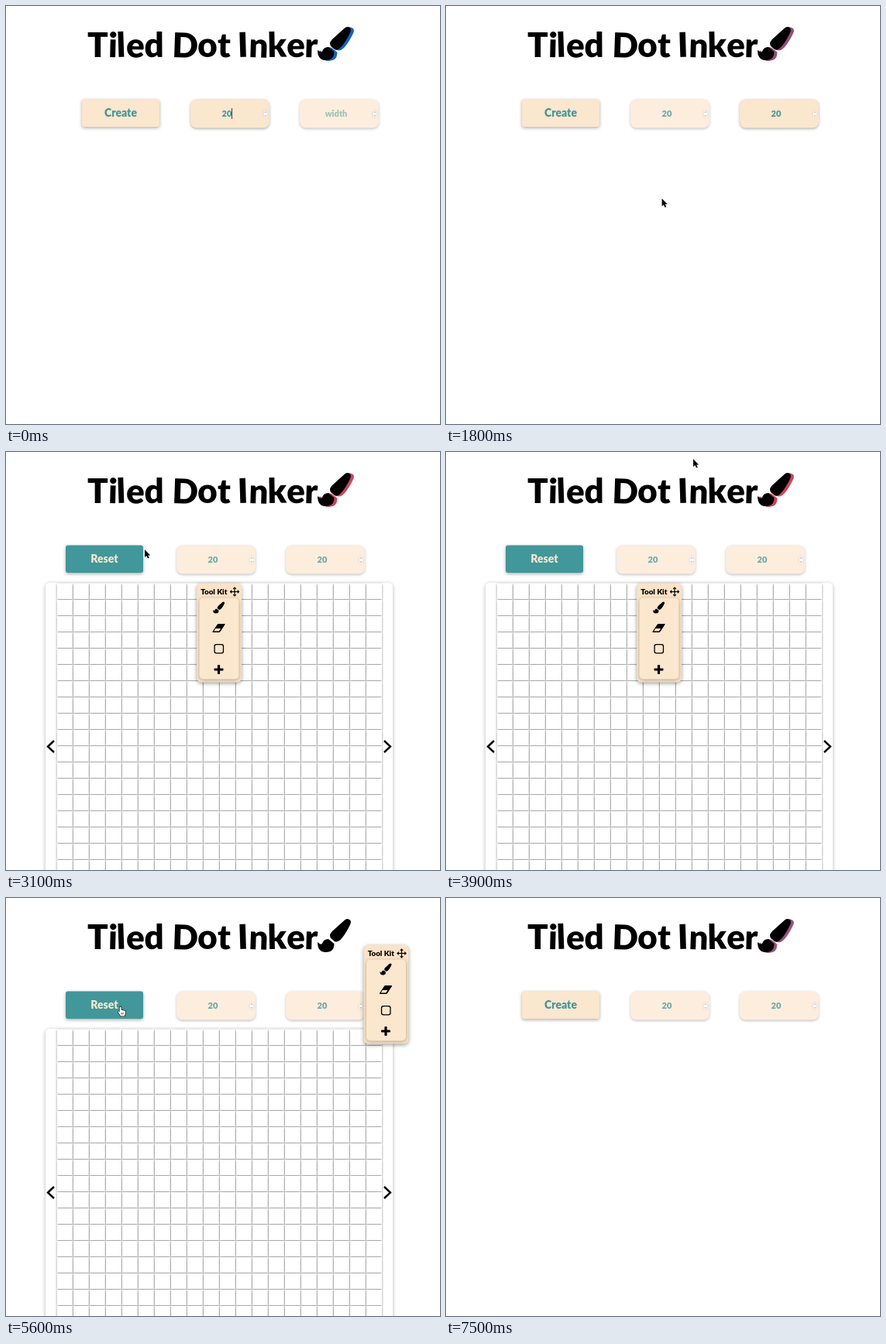
Animation, 560 px wide and 540 px high, one loop 7.6 s. Source, as an HTML page with a canvas:

```html
<!DOCTYPE html>
<html lang="en">
<head>
<meta charset="utf-8">
<title>Tiled Dot Inker</title>
<style>
html, body { margin: 0; width: 100%; height: 100%; overflow: hidden; background: #fff; }
canvas { display: block; }
</style>
</head>
<body>
<canvas id="stage" width="560" height="540"></canvas>
<script>
const W = 560, H = 540, LOOP = 7600;
const CREATE_AT = 2900, RESET_AT = 5900;
const DRAG_FROM = 4450, DRAG_TO = 4850;
const CREAM = '#fbe6ce', PALE = '#fdeddd', TEAL = '#41979a', INK = '#000';
const BLUE = [20, 98, 196], RED = [205, 68, 88];
const FACE = 'Lato, "Open Sans", sans-serif';
const ctx = document.getElementById('stage').getContext('2d');

const brush = new Path2D(
  'M14 26Q7.5 26 5.9 32Q4 34 0 30Q0 43 10.8 43Q21.5 43 21.4 32Z' +
  'M35 1.4Q39 -1.5 42 1.5Q44 4 41.8 8Q31 29.6 24 29.6L22.2 29.3L16.9 24.8Q14 20 20 15Z');
const arrow = new Path2D('M0 0V10L2.3 8L4 11.6L5.8 10.8L4.2 7.4H7.2Z');
const hand = new Path2D('M2.6 7V1.2Q3.6 -.4 4.6 1.2V4.6L8.5 5.4Q10.4 5.6 10.3 7L9 12.5H4L.4 7.2Q.6 5.4 2.6 7Z');

const spots = {
  page: { x: 300, y: 275 },
  create: { x: 179, y: 126 },
  top: { x: 319, y: 9 },
  kit: { x: 295, y: 180 },
  dock: { x: 510.5, y: 71 },
  reset: { x: 148, y: 140 },
  away: { x: 230, y: -14 }
};
const trips = [
  { to: 'create', from: 1600, until: 2350 },
  { to: 'top', from: 3300, until: 3850 },
  { to: 'kit', from: 4050, until: 4350 },
  { to: 'dock', from: DRAG_FROM, until: DRAG_TO },
  { to: 'reset', from: 5050, until: 5500 },
  { to: 'away', from: 6050, until: 6500 }
];

// Smooth 0 to 1 between two times
function ramp(t, from, until) {
  const p = Math.min(1, Math.max(0, (t - from) / (until - from)));
  return p * p * (3 - 2 * p);
}

const mix = (a, b, p) => a + (b - a) * p;

function pointerAt(t) {
  return trips.reduce((pos, trip) => {
    const p = ramp(t, trip.from, trip.until), end = spots[trip.to];
    return { x: mix(pos.x, end.x, p), y: mix(pos.y, end.y, p) };
  }, spots.page);
}

function box(c, x, y, w, h, r, fill, blur = 0, dy = 0, shade = 0) {
  c.save();
  c.shadowColor = `rgba(0,0,0,${shade})`;
  c.shadowBlur = blur;
  c.shadowOffsetY = dy;
  c.fillStyle = fill;
  c.beginPath();
  c.roundRect(x, y, w, h, r);
  c.fill();
  c.restore();
}

function line(points, width, color = INK) {
  ctx.strokeStyle = color;
  ctx.lineWidth = width;
  ctx.beginPath();
  points.forEach(([x, y]) => ctx.lineTo(x, y));
  ctx.stroke();
}

const chevron = (x, y, w, h, width, color) =>
  line([[x - w, y - h], [x, y], [x - w, y + h]], width, color);

function label(text, x, y, size, color, align = 'center') {
  ctx.font = `900 ${size}px ${FACE}`;
  ctx.textAlign = align;
  ctx.fillStyle = color;
  ctx.fillText(text, x, y);
}

function stamp(path, x, y, scale, color) {
  ctx.save();
  ctx.translate(x, y);
  ctx.scale(scale, scale);
  ctx.fillStyle = color;
  ctx.fill(path);
  ctx.restore();
}

function drawTitle(t) {
  const text = 'Tiled Dot Inker', size = 44;
  ctx.font = `900 ${size}px ${FACE}`;
  for (let i = 0; i < text.length; i++) {
    ctx.save();
    ctx.textAlign = 'left';
    ctx.translate(105 + ctx.measureText(text.slice(0, i)).width, 66);
    ctx.rotate(Math.sin(i * 2.4) * 0.035);
    label(text[i], 0, 0, size, INK, 'left');
    ctx.restore();
  }
  const back = ramp(t, 6700, 7500);
  const blue = 1 - ramp(t, 1100, 2200) + back * 0.3;
  ctx.save();
  ctx.globalAlpha = 1 - ramp(t, 4200, 5100) + back * 0.85;
  const color = `rgb(${RED.map((v, i) => Math.round(mix(v, BLUE[i], blue)))})`;
  for (let i = 1; i <= 4; i++) stamp(brush, 402 + i, 27 + i / 5, 1, color);
  ctx.restore();
  stamp(brush, 402, 27, 1, INK);
}

function button(text, x, fill, color) {
  box(ctx, x, 120.5, 100, 35.5, 3, fill, 4, 1.5, 0.33);
  label(text, x + 50, 143, 14, color);
}

function field(text, x, { focused = false, hint = false, caret = false } = {}) {
  box(ctx, x, 120.5, 102, 37, 8, focused ? CREAM : PALE, 3.5, 1.3, focused ? 0.33 : 0.25);
  ctx.globalAlpha = hint ? 0.5 : focused ? 1 : 0.8;
  label(text, x + 47, 143.2, 11, TEAL);
  ctx.globalAlpha = 1;
  if (caret) line([[x + 53.5, 132], [x + 53.5, 146]], 1, '#345');
  box(ctx, x + 94.5, 134.8, 5, 9.4, 2.5, '#fff', 1.5, 0, 0.25);
  for (const d of [-1, 1]) {
    ctx.save();
    ctx.translate(x + 97, 139.5 + d * 3);
    ctx.rotate(d * Math.PI / 2);
    chevron(0, 0, 1.1, 1, 0.8, '#666');
    ctx.restore();
  }
}

function makeBoard() {
  const board = document.createElement('canvas');
  board.width = W;
  board.height = H;
  const c = board.getContext('2d');
  box(c, 51, 169, 448, 400, 5, '#fff', 5, 1, 0.3);
  for (let y = 170; y < H; y += 21)
    for (let x = 66; x < 480; x += 21)
      box(c, x, y, 20, 20, 0, '#fff', 3, 1, 0.45);
  return board;
}
const board = makeBoard();

function drawBoard() {
  ctx.drawImage(board, 0, 0);
  chevron(54, 380.5, -8, 7.5, 2.4);
  chevron(496, 380.5, 8, 7.5, 2.4);
}

function moveIcon(x, y) {
  for (let i = 0; i < 4; i++) {
    ctx.save();
    ctx.translate(x, y);
    ctx.rotate(i * Math.PI / 2);
    line([[0, 0], [5, 0]], 1.2);
    chevron(5.5, 0, 1.8, 1.8, 1.2);
    ctx.restore();
  }
}

function eraserIcon(x, y) {
  ctx.save();
  ctx.transform(1, 0, -0.65, 1, x, y);
  box(ctx, -5, -5.5, 10, 11, 1, INK);
  box(ctx, -3.8, 0.5, 6.6, 3.4, 0, CREAM);
  ctx.restore();
}

function drawKit(dx, dy) {
  ctx.save();
  ctx.translate(dx, dy);
  box(ctx, 246, 169.5, 58, 128, 6, '#fae3c8', 5, 1.5, 0.38);
  box(ctx, 249.5, 188.5, 51, 105, 5, CREAM, 4, 1, 0.3);
  label('Tool Kit', 268.3, 183.7, 9.8, INK);
  moveIcon(295, 180.5);
  stamp(brush, 267, 193.5, 0.35, INK);
  eraserIcon(274.5, 227.5);
  box(ctx, 268.4, 247.9, 12.7, 12.7, 3, INK);
  box(ctx, 269.7, 249.2, 10.1, 10.1, 2, CREAM);
  box(ctx, 268.5, 279.4, 12, 3.2, 1, INK);
  box(ctx, 272.9, 275, 3.2, 12, 1, INK);
  ctx.restore();
}

function drawPointer(t, open) {
  if (t < 1500 || t > 6500) return;
  const { x, y } = pointerAt(t);
  const left = open ? 77 : 97;
  const overButton = x > left && x < left + 101 && y > 118 && y < 157;
  const pointing = overButton || (t > 4330 && t < 5100);
  const shape = pointing ? hand : arrow;
  ctx.save();
  ctx.translate(pointing ? x - 4 : x, y);
  ctx.lineJoin = 'round';
  ctx.lineWidth = 1.2;
  ctx.strokeStyle = pointing ? INK : '#fff';
  ctx.fillStyle = pointing ? '#fff' : INK;
  ctx.stroke(shape);
  ctx.fill(shape);
  if (pointing) for (const fx of [5, 7]) line([[fx, 8], [fx, 10.5]], 0.7);
  ctx.restore();
}

function draw(t) {
  const open = t >= CREATE_AT && t < RESET_AT;
  ctx.fillStyle = '#fff';
  ctx.fillRect(0, 0, W, H);
  drawTitle(t);
  if (open) {
    button('Reset', 77, TEAL, CREAM);
    field('20', 220);
    field('20', 361);
    drawBoard();
    const grip = pointerAt(Math.min(Math.max(t, DRAG_FROM), DRAG_TO));
    drawKit(grip.x - spots.kit.x, grip.y - spots.kit.y);
  } else {
    const typed = '20'.slice(0, Math.max(0, Math.floor((t - 950) / 200)));
    button('Create', 98, CREAM, TEAL);
    field('20', 238, { focused: t < 500, caret: t < 400 });
    field(typed || 'width', 379, {
      focused: t >= 500 && t < CREATE_AT,
      hint: !typed,
      caret: typed === '20' && t < 1800
    });
  }
  drawPointer(t, open);
}

function tick(now) {
  draw(now % LOOP);
  requestAnimationFrame(tick);
}
requestAnimationFrame(tick);
</script>
</body>
</html>
```
